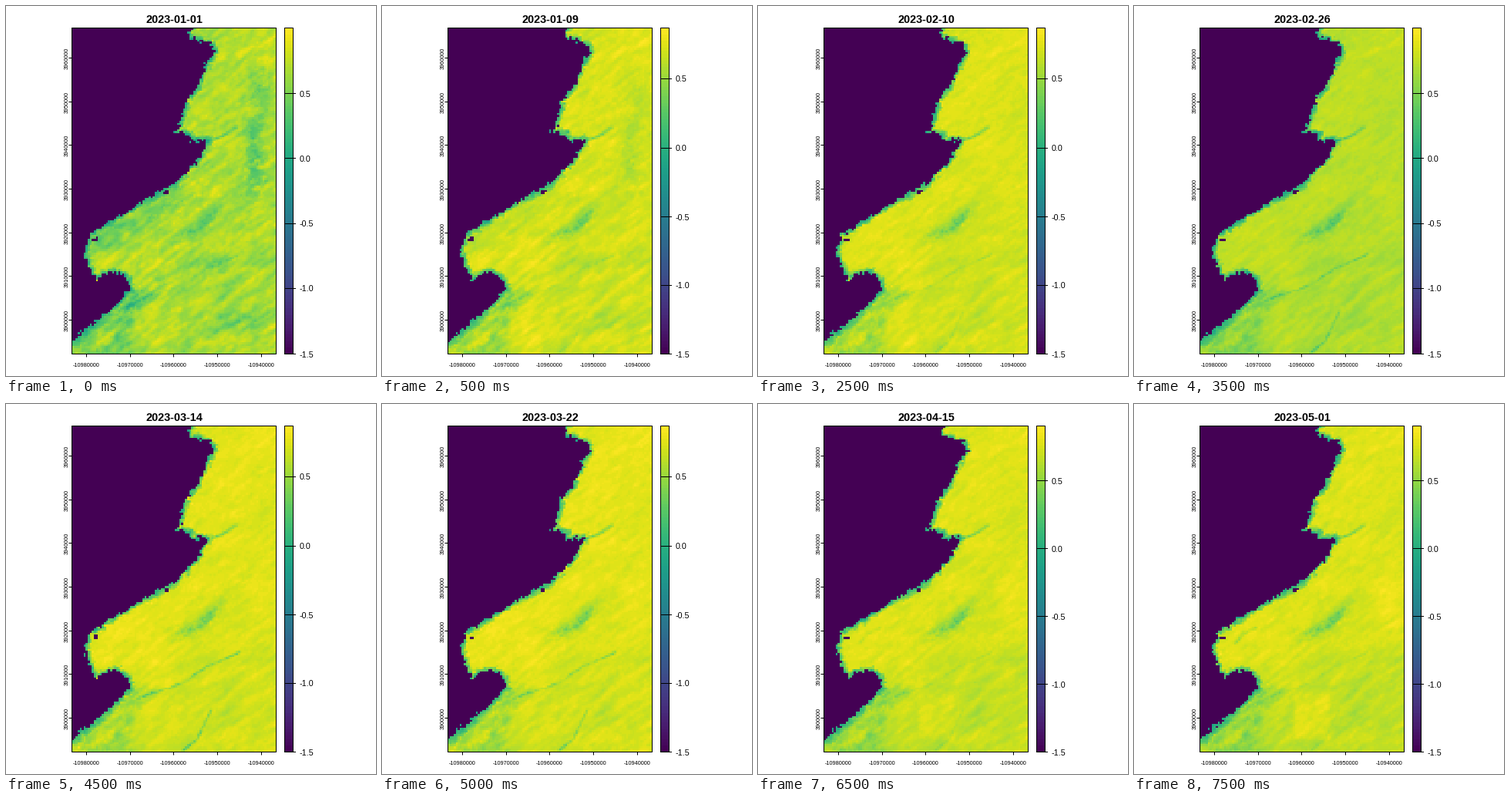
A matplotlib script for the animation above (8000 ms loop, 480 by 480 pixels).

```python
import numpy as np
import matplotlib.pyplot as plt
from matplotlib.animation import FuncAnimation
from matplotlib.path import Path
from matplotlib.patches import Rectangle

SIZE, DPI = 480, 100
PX = 72 / DPI
COLS, ROWS = 101, 161
LEFT, RIGHT, TOP, BOTTOM = 85.5, 350.5, 28.5, 451.5
BAR = 361.5, 372.5
VMIN = -1.5
FRAMES, STEP = 16, 500

rng = np.random.default_rng(7)
X, Y = np.meshgrid(LEFT + (np.arange(COLS) + .5) * (RIGHT - LEFT) / COLS,
                   TOP + (np.arange(ROWS) + .5) * (BOTTOM - TOP) / ROWS)

# Key points of the shore, north to south; noise adds the small inlets
COAST = [(241, 20), (238, 40), (268, 52), (270, 58), (247, 105), (234, 123),
         (226, 150), (220, 164), (240, 166), (240, 175), (263, 174),
         (244, 206), (218, 230), (186, 247), (152, 270), (130, 284),
         (108, 297), (102, 320), (117, 355), (126, 349), (147, 345),
         (158, 354), (162, 367), (149, 381), (120, 406), (78, 439)]


def noise(along, across, deg=35):
    """Unit-variance noise blurred more along one direction."""
    fx = np.fft.fftfreq(COLS)[None, :]
    fy = np.fft.fftfreq(ROWS)[:, None]
    a = np.radians(deg)
    u = fx * np.cos(a) - fy * np.sin(a)
    v = fx * np.sin(a) + fy * np.cos(a)
    kernel = np.exp(-2 * np.pi ** 2 * ((along * u) ** 2 + (across * v) ** 2))
    white = rng.standard_normal((ROWS, COLS))
    out = np.fft.ifft2(np.fft.fft2(white) * kernel).real
    return (out - out.mean()) / out.std()


def blob(cx, cy, rx, ry, deg=0):
    a = np.radians(deg)
    dx, dy = X - cx, Y - cy
    u = dx * np.cos(a) - dy * np.sin(a)
    v = dx * np.sin(a) + dy * np.cos(a)
    return np.exp(-((u / rx) ** 2 + (v / ry) ** 2))


def distance(points):
    best = np.full(X.shape, 1e9)
    for (x0, y0), (x1, y1) in zip(points, points[1:]):
        dx, dy = x1 - x0, y1 - y0
        t = ((X - x0) * dx + (Y - y0) * dy) / (dx * dx + dy * dy)
        t = np.clip(t, 0, 1)
        best = np.minimum(best, np.hypot(X - x0 - t * dx, Y - y0 - t * dy))
    return best


def depth(points):
    """Signed distance to a closed outline, positive inside."""
    pts = np.column_stack([X.ravel(), Y.ravel()])
    within = Path(points).contains_points(pts).reshape(X.shape)
    return np.where(within, 1, -1) * distance(points + points[:1])


def sigmoid(x):
    return 1 / (1 + np.exp(-np.clip(x, -50, 50)))


def line(points, width):
    return np.exp(-(distance(points) / width) ** 2)


def ramp(k, start, end):
    return np.clip((k - start) / (end - start), 0, 1)


streak, broad, spots = noise(3.2, .8), noise(10, 4), noise(1.8, .9)
fine, rough = noise(1, .6), noise(.5, .5)
patchy = np.clip(.85 + .3 * spots + .2 * rough, .1, 1.6)

shore = -depth(COAST + [(20, 439), (20, 20)])
fringe = np.maximum(6 + 1.5 * fine + 7 * blob(200, 243, 22, 10, 35)
                    + 9 * blob(105, 422, 30, 12, 40), 3)
pools = np.maximum(blob(117, 303, 6, 3.5), blob(209, 241, 6, 3.5, 25))

marsh = np.clip(blob(232, 295, 17, 10, 20) + blob(263, 276, 24, 8, 45), 0, 1)
inlet = line([(258, 178), (280, 169), (298, 158)], 2.2)
rivers = (line([(172, 381), (225, 363), (260, 341), (303, 322)], 1.8)
          + line([(230, 449), (248, 434), (266, 397)], 1.8))
creek = line([(132, 309), (142, 297), (158, 291)], 2.6)
lowland = sigmoid((depth([(70, 445), (163, 362), (192, 375), (163, 405),
                          (165, 470), (70, 470)]) + 4 * broad) / 4)
south = sigmoid((Y + .25 * (X - 220) - 350 + 8 * broad) / 12)
west = blob(135, 312, 45, 28, 20)
north = sigmoid((215 - Y) / 25)
east = blob(330, 262, 24, 48)
early_field = sigmoid(depth([(165, 402), (207, 402), (207, 470), (165, 470)])
                      / 2 + broad)
late_field = sigmoid(depth([(208, 373), (254, 373), (254, 434), (208, 434)])
                     / 1.5)

coast_haze = blob(142, 294, 42, 16, 25) + .6 * blob(205, 258, 34, 14, 35)
east_haze = blob(321, 185, 14, 45) + .7 * blob(331, 108, 14, 26) \
    + .7 * blob(328, 236, 22, 18)
south_haze = blob(276, 335, 20, 9, 30) + blob(202, 358, 11, 9) \
    + .8 * blob(308, 408, 30, 14, 10) + .8 * blob(166, 388, 34, 8, 40)
haze = .42 * coast_haze * (.85 + .2 * spots) + .28 * south_haze * patchy \
    + .3 * east_haze * np.clip(.9 + .6 * spots + .3 * rough, 0, 1.8)
glint = .17 * np.clip(spots + .5 * rough - .8, 0, 1) * (
    blob(325, 150, 26, 110) + blob(215, 250, 65, 40, 30))


def top(k):
    """Upper end of the scale; two dates reach 1."""
    return 1 if k in (0, 7) else .872 + .03 * ramp(k, 10, 13)


def field(k):
    early, late = 1 - ramp(k, 3, 10), ramp(k, 10, 15)
    storm, flow = np.exp(-k), np.exp(-((k - 8.5) / 2.5) ** 2)
    v = .705 + .035 * ramp(k, 6, 10) + .018 * broad + .012 * fine
    v += (.02 + .015 * south) * streak
    v += .012 * noise(2, .8) + .01 * noise(.5, .5)
    v -= .035 * (1 - early + late) * south
    v += .03 * west + .02 * north + (.02 + .06 * late) * east
    v += .07 * early * early_field + .09 * late * late_field
    v -= patchy * (.16 * lowland + .33 * marsh + .28 * inlet
                   + (.08 + .22 * flow) * rivers + .26 * late * creek)
    v += storm * (glint - haze - .03 + .04 * streak + .03 * noise(.8, .6))
    v = np.minimum(v, top(k) - .01)

    jitter = 1.3 * rough + .9 * noise(.5, .5)
    edge = np.clip((shore - jitter) / fringe, 0, 1)
    v = np.where(edge < 1, .1 * rough + v * edge, v)
    wet = (shore < jitter) | (pools + .08 * jitter > .62)
    return np.where(wet, VMIN, v)


grids = [field(k) for k in range(FRAMES)]
dates = [str(np.datetime64('2023-01-01') + 8 * k) for k in range(FRAMES)]

plt.rcParams['font.family'] = 'Liberation Sans'
plt.rcParams['path.snap'] = False
fig = plt.figure(figsize=(SIZE / DPI, SIZE / DPI), dpi=DPI, facecolor='white')
ax = fig.add_axes([0, 0, 1, 1])
cmap = plt.get_cmap('viridis').resampled(100)


def stroke(xs, ys):
    return ax.plot(xs, ys, color='black', lw=PX, solid_capstyle='butt')[0]


def label(x, y, s, size, **kw):
    return ax.text(x, y, s, fontsize=size * PX, color='black', **kw)


def panel(data, x0, x1):
    """Image on whole pixels with a one-pixel border on its rim."""
    ax.add_patch(Rectangle((x0, TOP), x1 - x0, BOTTOM - TOP, fill=False,
                           ec='black', lw=PX, zorder=3))
    return ax.imshow(data, cmap=cmap, interpolation='nearest',
                     extent=(x0 - .5, x1 + .5, BOTTOM + .5, TOP - .5))


image = panel(grids[0], LEFT, RIGHT)
panel(np.linspace(1, 0, 424)[:, None], *BAR)

for i in range(5):
    x = int(104.5 + 56.65 * i) + .5
    stroke([x, x], [BOTTOM, BOTTOM + 4])
    label(x - .5, 468, f'{-10980000 + 10000 * i}', 7.3, ha='center')
for i in range(7):
    y = int(67.5 + 56.65 * i) + .5
    stroke([LEFT - 4, LEFT], [y, y])
    label(79, y, f'{3960000 - 10000 * i}', 7.3, rotation=90,
          ha='center', va='center')

title = label(218, 22, '', 14.4, ha='center', weight='bold')
levels = np.arange(.5, -2, -.5)
ticks = [(stroke([361, 376], [0, 0]), label(380.5, 0, f'{v:.1f}', 10.8))
         for v in levels]

ax.set_xlim(0, SIZE)
ax.set_ylim(SIZE, 0)
ax.set_aspect('auto')
ax.axis('off')


def draw(k):
    image.set_data(grids[k])
    image.set_clim(VMIN, top(k))
    title.set_text(dates[k])
    scale = (BOTTOM - TOP) / (top(k) - VMIN)
    for v, (mark, text) in zip(levels, ticks):
        y = int(BOTTOM - (v - VMIN) * scale) + .5
        mark.set_ydata([y, y])
        text.set_y(y + 4)
    return []


anim = FuncAnimation(fig, draw, frames=FRAMES, interval=STEP, repeat=True,
                     repeat_delay=0, blit=False)
plt.show()
```
